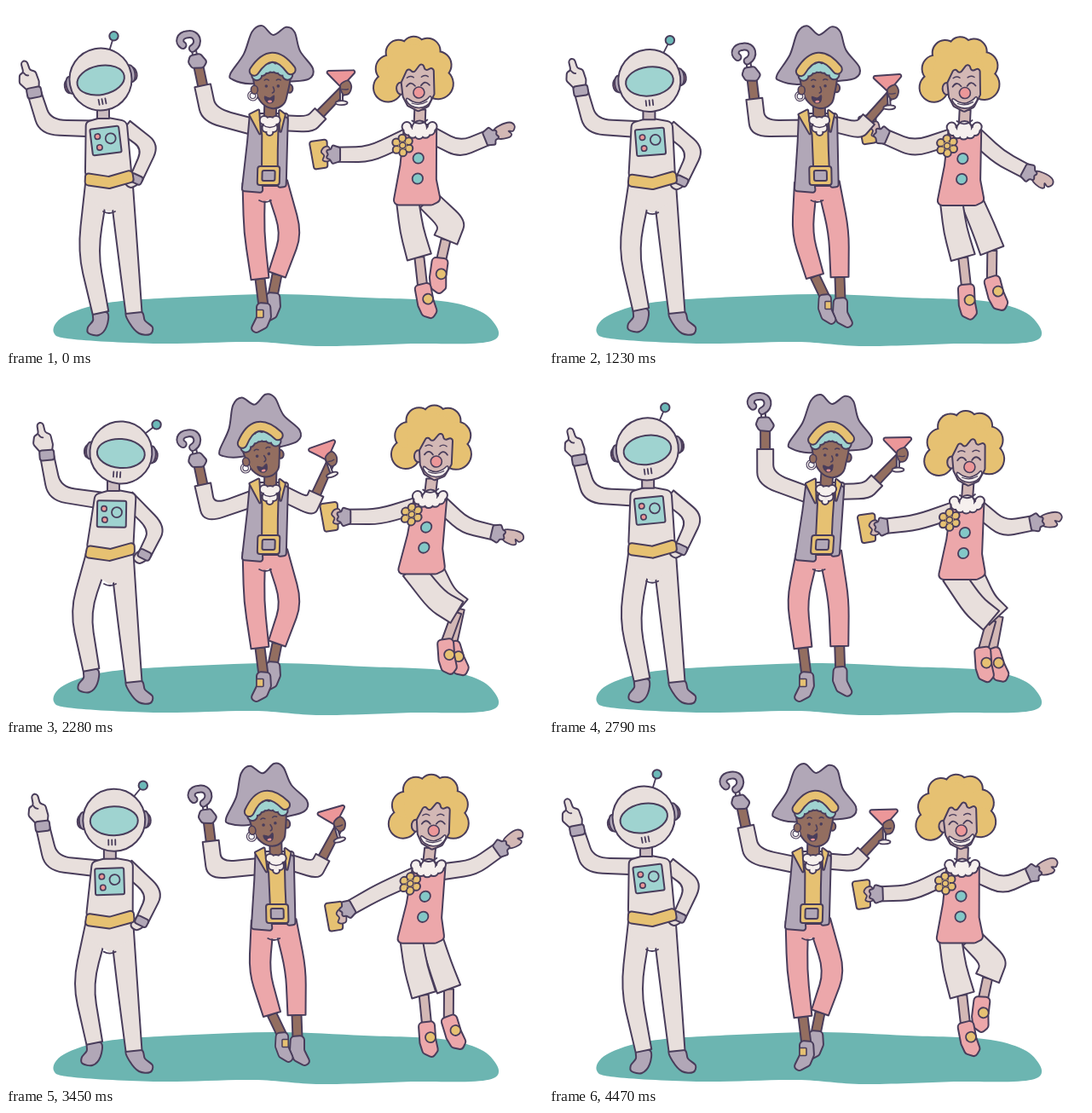
Recreate the animation shown at these times as an HTML page with a canvas. Size 630 by 400 pixels, loop 4.5 s.

```html
<!DOCTYPE html>
<html lang="en">
<head>
<meta charset="utf-8">
<title>Costume party</title>
<style>
  html, body { margin: 0; width: 100%; height: 100%; overflow: hidden; background: #fff; }
  canvas { display: block; width: 630px; height: 400px; }
</style>
</head>
<body>
<canvas id="stage"></canvas>
<script>
const LOOP = 4500;
const canvas = document.getElementById('stage');
const ctx = canvas.getContext('2d');
const dpr = window.devicePixelRatio || 1;
canvas.width = 630 * dpr;
canvas.height = 400 * dpr;

const INK = '#493d5b', CREAM = '#e8dfdc', GREY = '#b1a7b7', TEAL = '#9fd3d0', GROUND = '#6cb5b1',
  GOLD = '#e6c172', PINK = '#eca7aa', ROSE = '#ec9799', BROWN = '#936e60', SKIN = '#d3b8b5', WHITE = '#f6f0ee';

// ---------- maths ----------
const { PI, sin, cos, max, min } = Math;
const rad = d => d * PI / 180;
const mix = (a, b, k) => Array.isArray(a) ? a.map((v, i) => mix(v, b[i], k)) : a + (b - a) * k;
const ease = k => { k = max(0, min(1, k)); return k * k * (3 - 2 * k); };
const add = (p, x, y) => [p[0] + x, p[1] + y];
const polar = (p, deg, len) => add(p, cos(rad(deg)) * len, sin(rad(deg)) * len);
const heading = (a, b) => Math.atan2(b[1] - a[1], b[0] - a[0]) * 180 / PI;
const pulse = (turn, deg) => max(0, cos(turn - rad(deg))) ** 2;

// ---------- drawing ----------
function at([x, y], deg, draw, sx = 1) {
  ctx.save();
  ctx.translate(x, y);
  ctx.rotate(rad(deg));
  ctx.scale(sx, 1);
  draw();
  ctx.restore();
}
// Runs draw with the origin at `low`, leaning towards `top`.
function lean(top, low, draw) {
  ctx.save();
  ctx.transform(1, 0, (low[0] - top[0]) / (low[1] - top[1]), 1, low[0], low[1]);
  draw();
  ctx.restore();
}
function paint(fill, line = 2) {
  if (fill) { ctx.fillStyle = fill; ctx.fill(); }
  if (line) { ctx.strokeStyle = INK; ctx.lineWidth = line; ctx.stroke(); }
}
const pairs = a => Array.from({ length: a.length / 2 }, (_, i) => [a[2 * i], a[2 * i + 1]]);

// Polygon with rounded corners, from a flat list of coordinates.
function shape(flat, fill, r = 3, line = 2) {
  const p = pairs(flat), n = p.length;
  ctx.beginPath();
  ctx.moveTo(...mix(p[n - 1], p[0], .5));
  p.forEach((a, i) => ctx.arcTo(...a, ...mix(a, p[(i + 1) % n], .5), r));
  ctx.closePath();
  paint(fill, line);
}
const box = (x, y, w, h, fill, r = 2, line = 2) =>
  shape([x - w / 2, y - h / 2, x + w / 2, y - h / 2, x + w / 2, y + h / 2, x - w / 2, y + h / 2], fill, r, line);

// Closed smooth curve through its points.
function blob(flat, fill, line = 2) {
  const p = pairs(flat), n = p.length, g = i => p[(i + n) % n];
  ctx.beginPath();
  ctx.moveTo(...p[0]);
  for (let i = 0; i < n; i++) {
    const [a, b, c, d] = [g(i - 1), g(i), g(i + 1), g(i + 2)];
    ctx.bezierCurveTo(b[0] + (c[0] - a[0]) / 6, b[1] + (c[1] - a[1]) / 6,
      c[0] - (d[0] - b[0]) / 6, c[1] - (d[1] - b[1]) / 6, ...c);
  }
  paint(fill, line);
}
function oval(x, y, rx, ry, fill, line = 2) {
  ctx.beginPath();
  ctx.ellipse(x, y, rx, ry, 0, 0, 2 * PI);
  paint(fill, line);
}
const dot = (x, y, r, fill, line) => oval(x, y, r, r, fill, line);

function curve(x0, y0, cx, cy, x1, y1, w = 1.8, color = INK) {
  ctx.beginPath();
  ctx.moveTo(x0, y0);
  ctx.quadraticCurveTo(cx, cy, x1, y1);
  ctx.strokeStyle = color;
  ctx.lineWidth = w;
  ctx.stroke();
}
// Outlined tube along a polyline, tapering from width w0 to w1, with soft joints.
function limb(pts, w0, fill, w1 = w0) {
  const n = pts.length, left = [], right = [];
  pts.forEach((p, i) => {
    const a = rad(heading(pts[max(0, i - 1)], pts[max(1, i)]));
    const b = i > 0 && i < n - 1 ? rad(heading(p, pts[i + 1])) : a;
    const nx = -(sin(a) + sin(b)), ny = cos(a) + cos(b), len = Math.hypot(nx, ny) || 1;
    const half = mix(w0, w1, i / (n - 1)) / 2 / max(.72, len / 2) / len;
    left.push(add(p, nx * half, ny * half));
    right.unshift(add(p, -nx * half, -ny * half));
  });
  ctx.beginPath();
  for (const side of [left, right]) {
    side.forEach((p, i) => {
      if (i === 0 || i === n - 1) return ctx.lineTo(...p);
      ctx.lineTo(...mix(p, side[i - 1], .35));
      ctx.quadraticCurveTo(...p, ...mix(p, side[i + 1], .35));
    });
  }
  ctx.closePath();
  paint(fill);
}
// Union of circles with one outline.
function cluster(circles, fill) {
  for (const [grow, color] of [[1, INK], [-1, fill]])
    for (const [x, y, r] of circles) dot(x, y, r + grow, color, 0);
}
// Two legs joined by a plain seat, with a small fold at the crotch.
function trousers([x, y], width, drop, right, left, fill, hemWidth) {
  const w = width / 2;
  limb([[x + w / 2, y], ...right], w, fill, hemWidth);
  limb([[x - w / 2, y], ...left], w, fill, hemWidth);
  shape([x - w + 2, y - 2, x + w - 2, y - 2, x + w - 4, y + drop * .6, x, y + drop, x - w + 4, y + drop * .6], fill, 2, 0);
  curve(x - 7, y + drop - 1, x, y + drop + 3, x + 7, y + drop - 1);
}

// ---------- astronaut ----------
function astronaut(t) {
  const s = (1 - cos(t / 1500 * 2 * PI)) / 2;
  const dip = pulse(t / LOOP * 2 * PI, 48) ** 4;
  const m = (a, b) => mix(a, b, s);

  // legs
  const ankle = m([111, 360], [100, 346]);
  at(ankle, 0, () => blob([-8, 0, 8, 0, 7, 16, -2, 26, -14, 24, -15, 17, -9, 9], GREY));
  at([150, 360], 0, () => blob([-9, 0, 9, -1, 13, 9, 22, 17, 19, 25, 6, 24, -5, 12], GREY));
  const belt = m([121, 205], [122, 209]);
  trousers(belt, 55, 37, [[143, 290], [150, 360]], [m([96, 288], [87, 278]), ankle], CREAM, 19);

  // pointing arm
  const elbow = add(m([46, 142], [57, 139]), 2 * dip, 8 * dip);
  const cuff = add(m([33, 101], [48, 94]), 2 * dip, 12 * dip);
  limb([m([106, 144], [110, 147]), elbow, cuff], 19, CREAM, 16);
  at(cuff, heading(elbow, cuff) + 97, () => {
    shape([-6, -2, -15, -14, -13, -24, -8, -25, -9, -38, -2, -39, 0, -27, 6, -24, 8, -12, 6, -2], CREAM, 4);
    curve(-8, -25, -6, -21, -3, -21);
    box(0, 0, 17, 12, GREY, 3);
  });

  // arm on the hip
  const hip = m([153, 202], [163, 210]), out = m([170, 165], [178, 180]);
  at(hip, 0, () => blob([2, -5, -9, -2, -13, 6, -6, 11, 3, 5], CREAM));
  limb([m([140, 142], [142, 144]), out, hip], 18, CREAM, 15);
  at(hip, heading(out, hip) - 90, () => box(0, 1, 15, 10, GREY, 3));

  // torso
  const neck = m([114, 128], [126, 132]);
  lean(neck, belt, () => {
    shape([-21, -69, 0, -75, 27, -70, 27, -4, -28, -2, -24, -40], CREAM, 7);
    shape([-27, -9, 0, -5, 28, -13, 29, 1, 0, 9, -29, 5], GOLD, 4);
  });
  limb([add(neck, 0, -12), add(neck, 0, 4)], 14, '#cbbcc0');
  at(m([117, 158], [124, 163]), m(-7, 1), () => {
    box(0, 0, 34, 31, TEAL);
    dot(-9, -6, 3.2, ROSE, 1.6);
    dot(6, -2, 6, TEAL, 1.8);
    dot(-8, 7, 3.2, ROSE, 1.6);
  });

  // helmet
  const head = m([111, 86], [135, 91]);
  const mast = m(-73, -38), stem = polar(head, mast, 34), tip = polar(head, mast, 53);
  curve(...stem, ...stem, ...tip);
  dot(...tip, 5.2, '#6cb9b8');
  at(head, m(-11, 4), () => {
    for (const side of [-1, 1]) {
      oval(side * 38, 1, 5, 8, ROSE);
      oval(side * 36, 0, 5, 10, GREY);
    }
    dot(0, 0, 36.5, CREAM);
    oval(0, 1, 28, 17, TEAL);
    for (const x of [-7, -3, 1]) curve(x, 23, x, 25, x, 29);
  });
}

// ---------- pirate ----------
function pirateBoot(p, sx, buckle) {
  at(p, 0, () => {
    shape([-8, 0, 8, 1, 9, 17, 4, 29, -9, 36, -15, 31, -8, 17], GREY, 5);
    if (buckle) box(-4, 13, 8, 9, GOLD, 1, 1.6);
  }, sx);
}

function pirate(t, turn) {
  // c runs 1 (crossed right), 0 (apart), -1 (crossed left), twice per loop
  const c = cos(2 * turn), crossed = c * c;
  const drift = crossed * cos(turn - .7);
  const beat = cos(5 * turn - .75);
  const tilt = -.5 - 5.5 * crossed + 7 * drift;
  const head = [330 - 21.5 * crossed - 2.5 * c + 7 * drift, 95];
  const neck = [325 - 13 * crossed - 3 * c, 124];
  const belt = [320 - 8 * crossed - 5 * c, 199];

  // legs
  const rk = ease(1 - c), lk = ease(-c);
  const hemR = mix([318, 315], [341, 318], rk), hemL = mix([298, 320], [312, 317], lk);
  const footR = add(mix([313, 336], [342, 342], rk), 0, -5 * sin(PI * rk));
  const footL = add(mix([302, 348], [324, 338], lk), 0, -5 * sin(PI * lk));
  limb([hemR, add(footR, 0, 4)], 11, BROWN);
  pirateBoot(footR, 1 - 2 * rk, false);
  limb([hemL, add(footL, 0, 4)], 11, BROWN);
  pirateBoot(footL, 1 - 1.9 * lk, true);
  trousers(add(belt, -3, 9), 53, 21, [mix([335, 267], [340, 265], rk), hemR],
    [mix([291, 265], [297, 267], lk), hemL], PINK, 21);

  // glass arm
  const raise = 45 + 1.8 * tilt;
  const ge = [neck[0] + 48, 146 - 10 * beat], hand = polar(ge, raise - 90, 61);
  limb([ge, hand], 11, BROWN, 9);
  limb([add(neck, 12, 13), ge, mix(ge, hand, .28)], 18, CREAM);
  at(add(hand, -6, 0), 1.7 * tilt, () => {
    shape([-19, -19, 19, -19, 0, 1], ROSE, 2);
    limb([[0, 1], [0, 18]], 3, WHITE);
    oval(0, 19, 7, 2.5, WHITE, 1.8);
    at([6, 0], 0, () => {
      blob([-7, -2, 2, -7, 6, 0, 3, 8, -4, 9], BROWN, 1.8);
      curve(-5, 3, -1, 4, 2, 3, 1.4);
    });
  });

  // hook arm
  const swing = (neck[0] - 325) * .75;
  const he = [neck[0] - 71, 144 - 22 * beat], cuff = polar(he, swing - 90, 64);
  limb([he, cuff], 11, BROWN);
  limb([add(neck, -14, 19), he, mix(cuff, he, .45)], 19, CREAM);
  at(cuff, swing * .7 + 2, () => {
    limb([[-2, -6], [-3, -16]], 5, WHITE);
    for (const [w, color] of [[10, INK], [6, GREY]]) {
      ctx.beginPath();
      ctx.moveTo(-4, -16);
      ctx.bezierCurveTo(6, -21, 3, -34, -8, -33);
      ctx.bezierCurveTo(-18, -33, -20, -25, -15, -21);
      ctx.lineWidth = w;
      ctx.strokeStyle = color;
      ctx.stroke();
    }
    shape([-8, -8, 4, -9, 11, 1, 6, 8, -7, 7, -11, 0], GREY, 4);
  });

  lean(neck, belt, () => {
    shape([-22, -73, 22, -73, 20, 8, -24, 8], CREAM, 3);
    shape([-10, -58, 13, -58, 12, 12, -8, 12], GOLD, 1);
    shape([-23, -72, -13, -74, -8, -48, -7, 0, -5, 20, -30, 18, -25, -40], GREY, 3);
    shape([11, -66, 22, -70, 22, 13, 12, 14, 11, -30], GREY, 3);
    shape([-24, -72, -12, -78, -9, -45], GOLD, 1);
    shape([11, -78, 19, -72, 13, -45], GOLD, 1);
    box(1, 0, 26, 22, GOLD, 3);
    box(1, 0, 15, 12, GREY);
    limb([[1, -86], [1, -66]], 14, BROWN);
    cluster([[-6, -65, 5], [8, -65, 5], [1, -61, 8], [-3, -56, 5], [5, -56, 5], [1, -51, 4]], WHITE);
    curve(-8, -60, 1, -53, 10, -60, 1.4);
  });

  at(head, tilt, () => {
    blob([-48, -16, -32, -39, -22, -65, -10, -72, 3, -61, 18, -70, 28, -64, 34, -42, 49, -21, 44, -9, 20, -6, -25, -4, -45, -9], GREY);
    oval(21, 2, 4, 5, BROWN);
    blob([-18, -22, -19, 3, -12, 18, 0, 25, 12, 22, 18, 11, 20, -20], BROWN);
    dot(-22, 10, 4.5, null, 3.6);
    ctx.strokeStyle = WHITE; ctx.lineWidth = 1.4; ctx.stroke();
    oval(-20, 3, 4, 5, BROWN, 1.6);
    const curls = [];
    for (let i = -3; i <= 3; i++) curls.push([1 + i * 6, -23 + i * i, 6]);
    cluster(curls, TEAL);
    curve(-20, -19, 1, -50, 23, -20, 13);
    curve(-20, -19, 1, -50, 23, -20, 9, GOLD);
    for (const x of [-6, 8]) {
      dot(x, -1, 1.8, INK, 0);
      curve(x - 2, -8, x, -10, x + 3, -8, 1.5);
    }
    curve(2, 0, 5, 6, 1, 7, 1.6);
    blob([-8, 11, -2, 13, 3, 10, 2, 17, -3, 19, -7, 16], INK, 1);
    oval(-2, 17, 2.5, 1.4, ROSE, 0);
  });
}

// ---------- clown ----------
function ruffle(p, deg) {
  at(p, deg, () => shape([-7, -8, 2, -11, 5, -6, 10, -4, 7, 0, 10, 5, 4, 6, 2, 11, -7, 8], GREY, 2));
}
function clownLeg(hip, [knee, hem, ankle], toe) {
  limb([hem, add(ankle, 0, 4)], 11, SKIN);
  at(ankle, -toe, () => {
    shape([-10, 0, 9, -1, 9, 20, 11, 34, 4, 42, -7, 36, -10, 24], PINK, 5);
    dot(3, 18, 6, GOLD, 1.8);
  });
  return () => limb([hip, knee, hem], 26, CREAM, 29);
}

function clown(t, turn) {
  const crossed = cos(2 * turn) ** 2;
  const bounce = 1.5 + 6.5 * (1 - crossed);
  const sway = 16 * cos(3 * turn - rad(162)) + 6 - 12 * crossed + 6 * crossed * cos(turn - .7);
  const nose = [501 + sway, 100 + bounce];
  const collar = [495 + .6 * sway, 141 + .8 * bounce];
  const waist = [486 + .25 * sway, 230 + bounce];

  // legs: `kick` lifts the right one, `bend` swings both knees
  const kick = pulse(turn, 24), bend = pulse(turn, 195);
  const side = kick * 41 * sin(turn - rad(24));
  const pose = flat => pairs(flat).map(p => add(waist, ...p));
  const stand = pose([23, 28, 33, 56, 33, 88]);
  const rightLeg = mix(mix(stand, pose([28, 28, 46, 42, 36, 82]), bend), pose([54, 23, 51, 40, 44, 60]), kick)
    .map((p, i) => add(p, side * (i ? 1 : .5), 0));
  const leftLeg = mix(pose([-6, 31, 3, 63, 7, 95]), pose([20, 33, 44, 46, 30, 78]), bend);
  const shorts = [
    clownLeg(add(waist, 13, -4), rightLeg, mix(17, -13, kick)),
    clownLeg(add(waist, -11, -4), leftLeg, 4 - 8 * side / 17)
  ];
  shorts.forEach(draw => draw());

  // arm with the cup
  const reach = -27 * sin(turn) - 12 * sin(2 * turn);
  const le = add(collar, -59, 28 + 4 * cos(turn) + .1 * reach);
  const lc = polar(le, 180 - reach, 41), cup = polar(lc, 180 - reach, 17);
  limb([add(collar, -12, 10), le, lc], 19, CREAM, 17);
  at(cup, -5, () => {
    shape([-11, -16, 10, -17, 8, 16, -8, 17], GOLD, 3);
    blob([12, -7, 6, -8, 2, -3, 5, 2, 3, 7, 8, 9, 13, 6], SKIN, 1.8);
  });
  ruffle(lc, 180 - reach);

  // free arm
  const wave = 35 * cos(turn - rad(122)) - 4;
  const re = polar(collar, 40 - 45 * pulse(turn, 300), 54), rc = polar(re, wave, 39);
  limb([add(collar, 12, 8), re, rc], 19, CREAM, 17);
  at(rc, wave, () => blob([6, -5, 15, -8, 27, -7, 31, -1, 27, 4, 22, 2, 24, 7, 18, 9, 7, 5], SKIN, 1.8));
  ruffle(rc, wave);

  lean(collar, waist, () => {
    shape([-18, -91, 20, -93, 21, -60, 22, -28, 28, -3, 18, 2, -28, 2, -21, -45], PINK, 6);
    dot(0, -53, 6.2, '#83c8c7', 1.8);
    dot(0, -29, 6.2, '#83c8c7', 1.8);
    const petals = [[-19, -68, 6]], frill = [[0, -88, 9]];
    for (let i = 0; i < 6; i++) petals.push([...polar([-19, -68], i * 60 + 25, 8.5), 4.4]);
    for (let i = 0; i < 7; i++) frill.push([...polar([0, -90], i * 30, 1).map((v, j) => j ? -90 + 9 * (v + 90) : 15 * v), 5.5]);
    cluster(petals, GOLD);
    dot(-19, -68, 3.6, GOLD, 1.6);
    limb([[0, -110], [0, -90]], 13, SKIN);
    cluster(frill, WHITE);
    curve(-9, -97, 0, -90, 9, -98);
  });

  at(nose, .2 * sway, () => {
    cluster([[-36, -8, 17], [-33, -30, 16], [-21, -48, 15], [-3, -52, 14], [13, -48, 15], [24, -31, 16], [23, -9, 18],
      [-6, -28, 30]], GOLD);
    oval(-21, -6, 5, 7, SKIN);
    shape([-19, 4, -20, -13, -11, -30, -5, -23, 6, -36, 9, -25, 19, -29, 18, 3, 10, 17, -2, 22, -14, 15], SKIN, 3);
    for (const x of [-9, 8]) {
      curve(x - 5, -8, x, -15, x + 5, -8);
      curve(x - 4, -18, x, -21, x + 4, -18, 1.4);
    }
    blob([-14, 6, -8, 10, 0, 12, 8, 9, 13, 5, 14, 9, 8, 16, -1, 18, -10, 15, -15, 9], WHITE, 1.6);
    curve(-9, 12, 0, 16, 9, 11, 1.2);
    dot(0, 0, 6.5, ROSE, 1.6);
  });
}

// ---------- loop ----------
function frame() {
  const t = performance.now() % LOOP, turn = t / LOOP * 2 * PI;
  ctx.setTransform(dpr, 0, 0, dpr, 0, 0);
  ctx.fillStyle = '#fff';
  ctx.fillRect(0, 0, 630, 400);
  ctx.lineJoin = ctx.lineCap = 'round';
  blob([56, 383, 68, 364, 120, 348, 220, 341, 320, 338, 420, 342, 510, 346, 556, 358, 576, 377, 574, 391,
    545, 396, 480, 396, 370, 399, 290, 394, 180, 396, 80, 391], GROUND, 0);
  astronaut(t);
  clown(t, turn);
  pirate(t, turn);
  requestAnimationFrame(frame);
}
frame();
</script>
</body>
</html>
```
